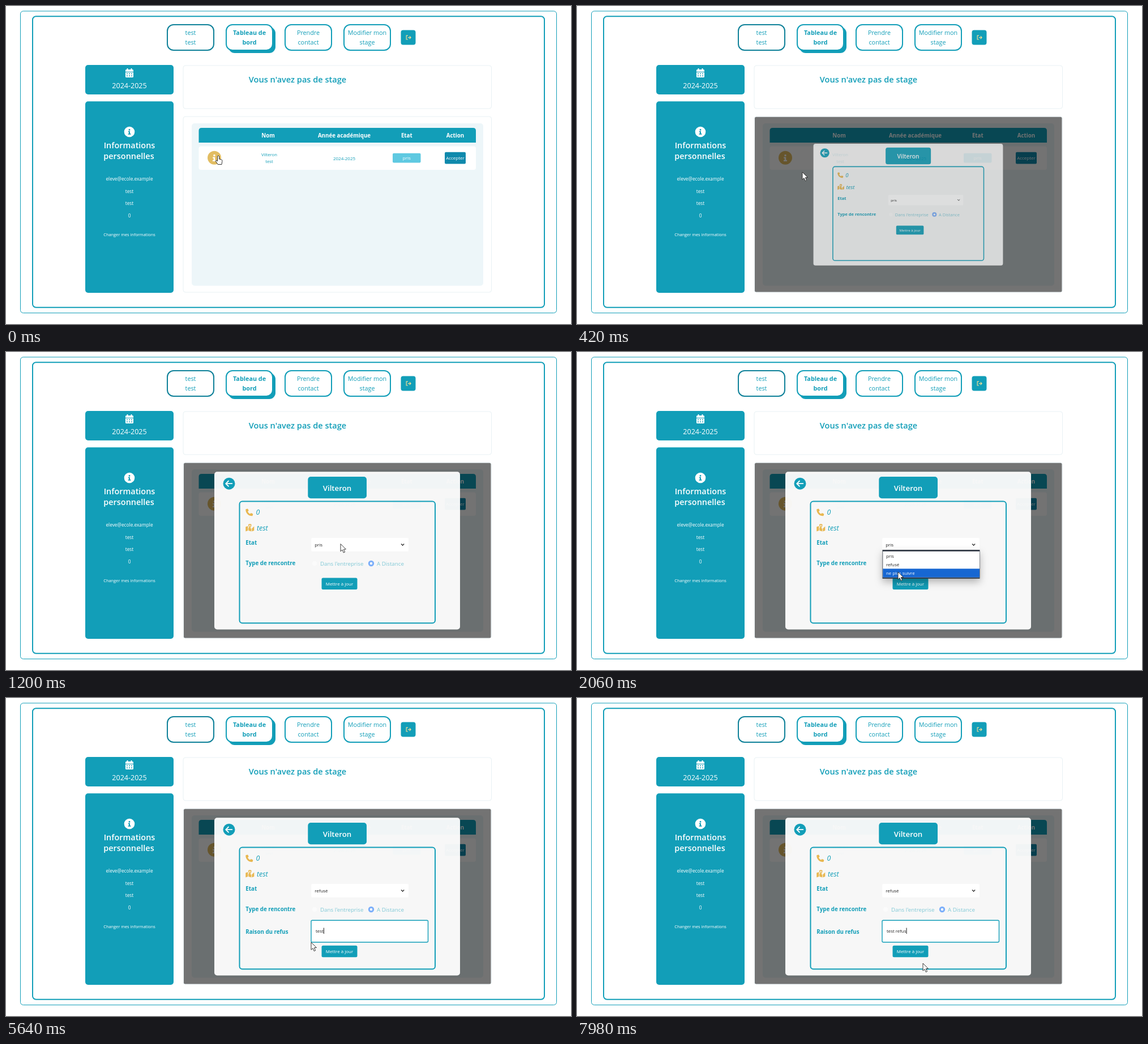
Recreate the animation shown at these times as an HTML page. Size 998x561 px, loop 8000 ms.

```html
<!DOCTYPE html>
<html lang="fr">
<head>
<meta charset="utf-8">
<title>Tableau de bord</title>
<style>
  html, body { margin: 0; width: 100%; height: 100%; overflow: hidden; background: #fff; }
  svg { display: block; width: 100vw; height: 100vh; }
  text { font: 8px "Open Sans", "Noto Sans", sans-serif; white-space: pre; }
  .teal { fill: #129eb8; }
  .white { fill: #fff; }
  .line { fill: none; stroke: #129eb8; stroke-width: 2; }
  .card { fill: #fff; stroke: #e8f1f4; }
  .mid text, text.mid { text-anchor: middle; }
  .nav text { font-size: 10.8px; }
  .side text { font-size: 8.3px; }
  .side .big { font-size: 14.45px; font-weight: 600; }
  .head text { font-size: 9.75px; font-weight: 700; }
  .label text { font-size: 9.75px; font-weight: 700; }
  .contact text { font-size: 12.4px; font-style: italic; }
  .choice { opacity: .52; }
  .choice text { font-size: 9.75px; }
  .ink { fill: #222; font-size: 7.85px; }
  #modal { transform-origin: 585px 350.5px; }
  #menu { filter: drop-shadow(0 6px 7px rgba(0, 0, 0, .28)); }
  #pointer path { fill: #fff; stroke: #222; stroke-width: .9; stroke-linejoin: round; }
</style>
</head>
<body>
<svg viewBox="0 0 998 561">
  <defs>
    <g id="info">
      <circle cy="-3.6" r="1.4"/>
      <path d="M-2.2 -1.2H1V3H2.4V4.8H-2.4V3H-1V.6H-2.2z"/>
    </g>
  </defs>

  <rect class="line" x="25.5" y="9" width="947" height="532.5" rx="5" style="stroke-width:1"/>
  <rect class="line" x="47" y="18.3" width="904" height="513.5" rx="6"/>

  <g class="nav mid teal">
    <rect x="393" y="37" width="83" height="46" rx="11"/>
    <g class="line" style="fill:#fff">
      <rect x="285" y="33" width="82" height="45" rx="11" stroke="#0f8199" style="stroke:#0f8199"/>
      <rect x="389" y="33" width="82" height="45" rx="11"/>
      <rect x="493" y="33" width="82" height="45" rx="11"/>
      <rect x="597" y="33" width="82" height="45" rx="11"/>
    </g>
    <text x="326" y="50.5">test</text><text x="326" y="67.5">test</text>
    <g style="font-weight:700">
      <text x="430" y="50.5" style="font-weight:700">Tableau de</text>
      <text x="430" y="67.5" style="font-weight:700">bord</text>
    </g>
    <text x="534" y="50.5">Prendre</text><text x="534" y="67.5">contact</text>
    <text x="638" y="50.5">Modifier mon</text><text x="638" y="67.5">stage</text>
    <rect x="697.5" y="42.5" width="26" height="26" rx="4"/>
    <path d="M710 52.2h-2.8v6.8h2.8M709.8 55.6h5M712.7 53.2l2.4 2.4l-2.4 2.4" fill="none" stroke="#f0dc95" stroke-width="1.2"/>
  </g>

  <g class="side mid white">
    <rect class="teal" x="140" y="104" width="156" height="52" rx="5"/>
    <rect class="teal" x="140" y="168.3" width="156" height="337.7" rx="5"/>
    <path d="M211 116v-2.5q0-1.5 1.5-1.5h11q1.5 0 1.5 1.5v2.5zM211 117h14v7.5q0 1.5-1.5 1.5h-11q-1.5 0-1.5-1.5zM213.5 110h2v4h-2zM220.500 110h2v4h-2z"/>
    <path class="line" d="M213 119.500h10M213 123.300h10" stroke-dasharray="2 2" style="stroke-width:1.6"/>
    <text x="218" y="145" style="font-size:12.55px">2024-2025</text>
    <circle cx="218" cy="222" r="9.3"/>
    <use href="#info" class="teal" transform="translate(218 222)"/>
    <text class="big" x="218" y="251.300">Informations</text>
    <text class="big" x="217" y="270">personnelles</text>
    <text x="218" y="308">eleve@ecole.example</text>
    <text x="218" y="329.700">test</text>
    <text x="218" y="351.200">test</text>
    <text x="218" y="373">0</text>
    <text x="218" y="405.700" style="font-size:7.36px">Changer mes informations</text>
  </g>

  <rect class="card" x="313" y="105" width="544.5" height="76" rx="4"/>
  <text class="teal mid" x="515" y="135" style="font-size:14.55px;font-weight:600">Vous n'avez pas de stage</text>

  <rect class="card" x="313" y="195" width="544.5" height="310" rx="4"/>
  <rect x="328" y="207" width="515" height="286.5" rx="5" fill="#edf6f9"/>
  <path class="teal" d="M340.500 241V220q0-5 5-5H825q5 0 5 5V241z"/>
  <rect class="white" x="340.5" y="247.500" width="489.5" height="41.500" rx="4"/>
  <g class="head mid white">
    <text x="463" y="232.300">Nom</text>
    <text x="597.5" y="232.300">Année académique</text>
    <text x="707.800" y="232.300">Etat</text>
    <text x="793.500" y="232.300">Action</text>
  </g>
  <g class="mid teal">
    <circle cx="368" cy="267.700" r="12" fill="#e2bd62"/>
    <use href="#info" class="white" transform="translate(368 268) scale(1.25)"/>
    <text x="465" y="265" style="font-size:7.7px">Vilteron</text>
    <text x="465" y="277.300" style="font-size:7.7px">test</text>
    <text x="597.5" y="272">2024-2025</text>
    <rect x="683" y="259.800" width="49.500" height="16.700" rx="2" fill="#5fc9e1"/>
    <text class="white" x="707.800" y="271">pris</text>
    <rect x="775" y="257.800" width="37" height="20.700" rx="2" fill="#0f89ac"/>
    <text class="white" x="793.500" y="271">Accepter</text>
  </g>

  <rect id="shade" x="314" y="195.800" width="542.500" height="308.700" rx="2.500" fill="#000" opacity=".55"/>

  <g id="modal">
    <rect class="white" x="368" y="211.300" width="434" height="278.200" rx="5" opacity=".945"/>
    <circle class="teal" cx="394" cy="232.200" r="10.500"/>
    <path d="M400 232.200H388.500M393.500 227l-5.200 5.200l5.200 5.200" fill="none" stroke="#fff" stroke-width="1.800"/>
    <rect class="teal" x="533.300" y="220" width="103.700" height="38.300" rx="5"/>
    <text class="white mid" x="585" y="244.500" style="font-size:13.3px;font-weight:600">Vilteron</text>
    <rect class="line" x="412.500" y="263.500" width="345.500" height="214.700" rx="5"/>

    <g fill="#e8b750">
      <path transform="translate(423.300 276.300)" d="M3.2.2L.6.9Q0 1 0 1.700C0 8 5 13 11.300 13Q12 13 12.200 12.400L13 10Q13 9.200 12.400 8.900L10 7.900Q9.200 7.700 8.800 8.200L7.700 9.400Q5 8 3.600 5.300L4.900 4.200Q5.400 3.800 5.100 3L4.100.7Q3.800.1 3.200.2z"/>
      <path transform="translate(423.300 303.500)" d="M0 5L4 3.500V11.500L0 13zM5 6l5 2V13l-5-1.500zM11 8l4-4V11.500L11 13z"/>
      <path transform="translate(430.800 303.500)" fill-rule="evenodd" d="M0 8.500C-5-.5-2 0 0 0S5-.5 0 8.500zM-1.200 3a1.200 1.200 0 1 0 2.400 0a1.200 1.200 0 1 0-2.400 0z"/>
    </g>
    <g class="contact teal">
      <text x="441.500" y="287">0</text>
      <text x="443" y="315">test</text>
    </g>
    <g class="label teal">
      <text x="423.300" y="339.700">Etat</text>
      <text x="423.300" y="376">Type de rencontre</text>
    </g>

    <rect class="white" x="539.300" y="328" width="171.700" height="23.700" rx="2"/>
    <text id="state" class="ink" x="545.300" y="342.800"></text>
    <path d="M698 338.500l2.600 2.600l2.600-2.600" fill="none" stroke="#222" stroke-width="1.200"/>
    <g class="choice teal">
      <circle class="white" cx="545" cy="373" r="4"/>
      <text x="555" y="376.800">Dans l'entreprise</text>
      <circle class="white" cx="645" cy="373" r="3.700" stroke="#0d6efd" stroke-width="3"/>
      <text x="655" y="376.800">A Distance</text>
    </g>

    <g id="reason">
      <g class="label teal"><text x="423.300" y="415.500">Raison du refus</text></g>
      <rect id="field" class="white" x="539" y="392.300" width="206.500" height="38.400" rx="2" stroke-width="1.400"/>
      <text id="typed" class="ink" x="547" y="413.700"></text>
      <rect id="caret" y="405.500" width=".9" height="10.500"/>
    </g>
    <g id="update">
      <rect class="teal" x="557.500" y="398.500" width="63" height="20.500" rx="2.500"/>
      <text class="white mid" x="589" y="411.700">Mettre à jour</text>
    </g>
    <g id="menu">
      <rect x="539.500" y="349" width="172" height="50.800" fill="#2f3743"/>
      <rect class="white" x="540.300" y="351.700" width="170.700" height="45.800"/>
      <rect id="hover" x="540.300" width="170.700" height="15.300" fill="#1767d2"/>
      <text class="ink" x="546" y="362.500">pris</text>
      <text class="ink" x="546" y="377.600">refusé</text>
      <text class="ink" x="546" y="392.700">ne plus suivre</text>
    </g>
  </g>

  <g id="pointer">
    <path id="arrow" d="M0 0V13.200L3 10.500L5.300 15.500L7.600 14.400L5.300 9.700L9.400 9.400z"/>
    <path id="hand" d="M-1.500 1Q0-1 1.500 1V6L5.600 7Q7.200 7.500 6.900 9.500L6 15.500H-.8L-4.500 10Q-5 8-3 8.400L-1.500 9.800z"/>
    <path id="beam" d="M-2-4.500H2M0-4.500V4.500M-2 4.500H2"/>
  </g>
</svg>

<script>
const $ = id => document.getElementById(id);
const show = (id, on) => $(id).style.display = on ? '' : 'none';
const attr = (id, name, value) => $(id).setAttribute(name, value);

const LOOP = 8000, OPEN = 160, MENU = 1400, PICK = 2500, FOCUS = 3400;
const ANSWER = 'test refus';
const KEYS = [5220, 5340, 5440, 5540, 6320, 6620, 6840, 7100, 7420, 7680];

// Pointer stops: time, x, y
const PATH = [
  [0, 375, 264], [140, 375, 264], [420, 398, 293], [1160, 591, 338.5], [1400, 591, 339],
  [1640, 578, 354], [2060, 567, 388], [2200, 566, 388], [2420, 562, 376], [2500, 562, 376],
  [3300, 571.5, 406.5], [3600, 571.5, 406.5], [4120, 562, 411], [4340, 562, 411],
  [5100, 545, 424], [5400, 545, 424], [5640, 539, 431], [5740, 540, 444],
  [5900, 540, 444], [6320, 554.5, 439.5], [7800, 554.5, 439.5], [7980, 611, 468]
];

function pointerAt(t) {
  const i = PATH.findIndex(p => p[0] > t);
  if (i < 0) return PATH.at(-1).slice(1);
  const [a, b] = [PATH[i - 1], PATH[i]];
  const p = (t - a[0]) / (b[0] - a[0]), e = p * p * (3 - 2 * p);
  return [a[1] + (b[1] - a[1]) * e, a[2] + (b[2] - a[2]) * e];
}

function draw(t) {
  const [x, y] = pointerAt(t);
  const picked = t >= PICK, focused = t >= FOCUS;

  // The dialog grows and fades in together
  const p = Math.min(1, Math.max(0, (t - OPEN) / 500));
  const grow = 1 - (1 - p) ** 2;
  show('shade', t >= OPEN);
  show('modal', grow > 0);
  $('modal').style.transform = grow < 1 ? `scale(${grow})` : 'none';
  $('modal').style.opacity = grow;

  $('state').textContent = picked ? 'refusé' : 'pris';
  attr('update', 'transform', `translate(0 ${picked ? 38.3 : 0})`);

  show('menu', t >= MENU && !picked);
  const row = Math.min(2, Math.max(0, Math.floor((y - 351.7) / 15.3)));
  attr('hover', 'y', 351.7 + row * 15.3);
  document.querySelectorAll('#menu text').forEach((el, i) => el.style.fill = i === row ? '#fff' : '#222');

  show('reason', picked);
  attr('field', 'stroke', focused ? '#129eb8' : 'none');
  const count = KEYS.filter(k => k <= t).length;
  $('typed').textContent = count ? ANSWER.slice(0, count) : 'Raison du refus';
  $('typed').style.fill = count ? '#222' : '#7b7f84';
  const since = t - (count ? KEYS[count - 1] : FOCUS);
  show('caret', focused && since % 1060 < 530);
  if (picked) attr('caret', 'x', 547.2 + (count ? $('typed').getComputedTextLength() : 0));

  const inField = picked && x > 539 && x < 746 && y > 392 && y < 430.5;
  show('hand', t < OPEN);
  show('beam', inField);
  show('arrow', t >= OPEN && !inField);
  attr('pointer', 'transform', `translate(${x} ${y})`);
}

function tick() {
  draw(performance.now() % LOOP);
  requestAnimationFrame(tick);
}
tick();
</script>
</body>
</html>
```
